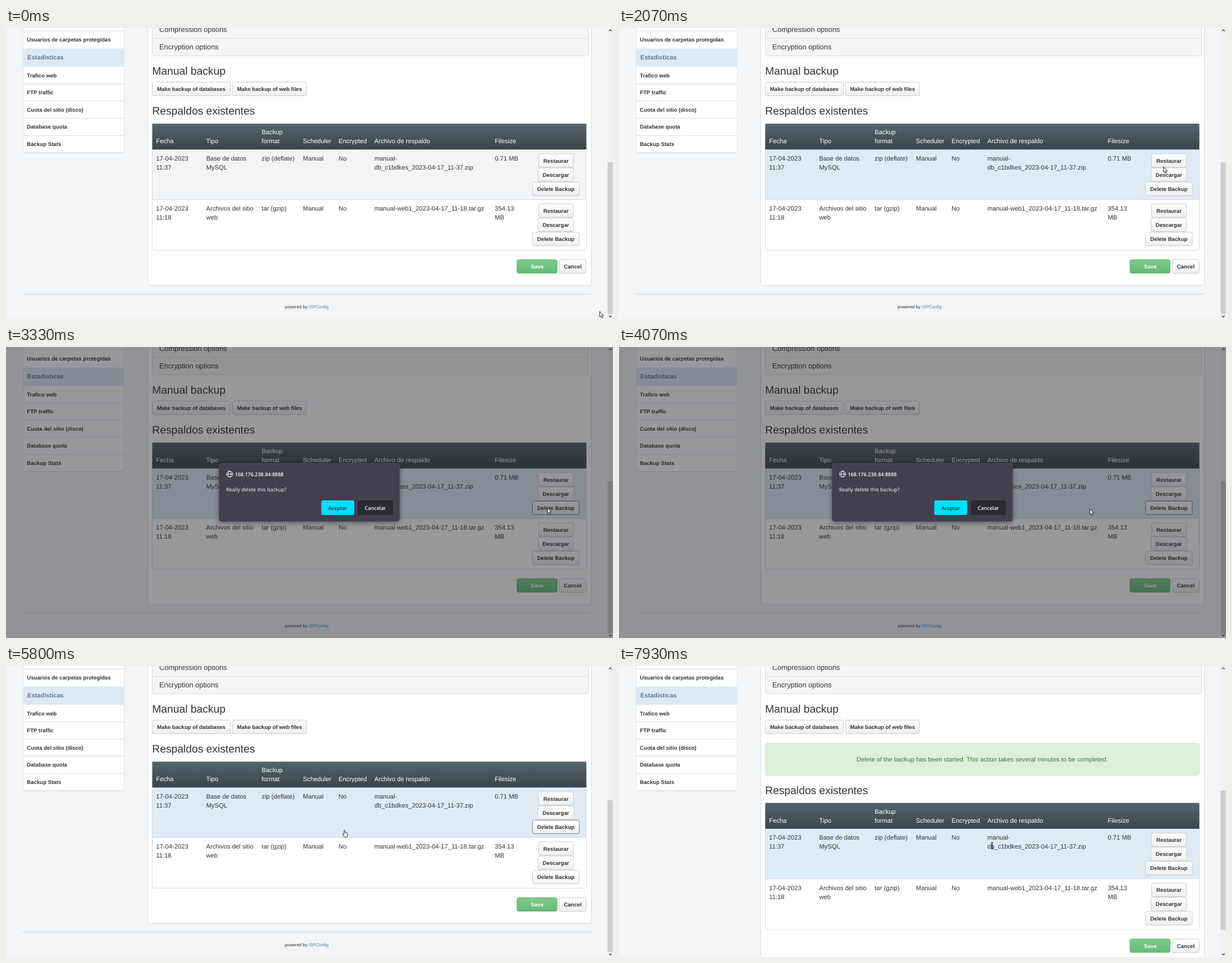
An HTML page that plays this animation: 1081 by 518 pixels, repeating every 8 s.

```html
<!DOCTYPE html>
<html lang="es">
<head>
<meta charset="utf-8">
<title>Backups</title>
<style>
  html, body { margin: 0; width: 100%; height: 100%; overflow: hidden; background: #f3f5f7; }
  svg { display: block; width: 1081px; height: 518px; text-rendering: geometricPrecision; }
  text { font-family: "Liberation Sans", Arial, sans-serif; font-size: 11.23px; fill: #333; white-space: pre; }
  .b { font-weight: 700; font-size: 9.63px; }
  .h { font-size: 19.26px; }
  .o { font-size: 12.84px; }
  .th { fill: #fff; }
  .f { font-size: 7.85px; }
  .d { font-family: "Open Sans", "Noto Sans", sans-serif; font-size: 9px; fill: #fbfbfe; }
  .s { font-weight: 600; }
  .hide { display: none; }
</style>
</head>
<body>
<svg id="stage" viewBox="0 0 1081 518">
  <defs>
    <linearGradient id="head" x2="0" y2="1"><stop stop-color="#56646c"/><stop offset="1" stop-color="#3b444b"/></linearGradient>
    <linearGradient id="btn" x2="0" y2="1"><stop stop-color="#fff"/><stop offset="1" stop-color="#efefef"/></linearGradient>
    <linearGradient id="save" x2="0" y2="1"><stop stop-color="#7ccb8b"/><stop offset="1" stop-color="#67ba78"/></linearGradient>
    <filter id="shadow" x="-10%" y="-20%" width="120%" height="150%">
      <feDropShadow dx="0" dy="2" stdDeviation="4" flood-opacity=".4"/>
    </filter>
  </defs>
</svg>
<script>
const LOOP = 8000, STEP = 1000 / 15, SHIFT = 73.5;
const stage = document.getElementById('stage');

const rect = (x, y, w, h, fill, extra = '') =>
  `<rect x="${x}" y="${y}" width="${w}" height="${h}" fill="${fill}" ${extra}/>`;
const line = (x1, x2, y, color) =>
  `<path d="M${x1} ${y}H${x2}" stroke="${color}"/>`;
const text = (x, y, s, cls = '', extra = '') =>
  `<text x="${x}" y="${y}" class="${cls}" ${extra}>${s}</text>`;
const mid = 'text-anchor="middle"';

function button(x, y, w, label, id = '') {
  return rect(x, y + 1, w, 24, '#000', 'rx="3" opacity=".07"') +
    rect(x, y, w, 24, 'url(#btn)', `rx="3" stroke="#cbcdcf" id="${id}"`) +
    text(x + w / 2, y + 15.6, label, 'b', mid);
}

function sidebar() {
  const items = [['Usuarios de carpetas protegidas', 23.8], ['Trafico web', 88], ['FTP traffic', 118.4],
    ['Cuota del sitio (disco)', 148.9], ['Database quota', 179.4], ['Backup Stats', 209.8]];
  return rect(30.5, -5, 180, 227, '#fff', 'rx="3" stroke="#dfe4e9"') +
    rect(30, 36.5, 181, 32.5, '#dce9f5') +
    [5, 99.5, 130, 160.5, 191.5].map(y => line(30, 211, y, '#d6e2ec')).join('') +
    line(32, 209, 222, '#d3d9df') +
    items.map(([s, y]) => text(37.3, y, s, 'b')).join('') +
    text(38, 55.7, 'Estadisticas', 'b', 'style="font-size:11.1px;fill:#5f7c98"');
}

function row(y, id, fill, cells) {
  return rect(261, y, 772, 89.3, fill, `id="${id}"`) +
    cells.map(([x, ...lines]) => lines.map((s, i) => text(x, y + 19.6 + i * 16, s)).join('')).join('') +
    button(948.5, y + 7.6, 62, 'Restaurar') +
    button(947.5, y + 32.8, 63.5, 'Descargar') +
    button(937.5, y + 58, 83.5, 'Delete Backup', id + 'del');
}

function table() {
  const heads = [[267.3, 'Fecha'], [356.5, 'Tipo'], [455.3, 'format'], [528.8, 'Scheduler'],
    [592.3, 'Encrypted'], [656, 'Archivo de respaldo'], [870.5, 'Filesize']];
  return text(260.3, 154.3, 'Respaldos existentes', 'h') +
    row(216.3, 'row1', '#f3f4f6', [[267.3, '17-04-2023', '11:37'], [356.5, 'Base de datos', 'MySQL'],
      [455.3, 'zip (deflate)'], [528.8, 'Manual'], [592.3, 'No'],
      [656, 'manual-', 'db_c1bdkes_2023-04-17_11-37.zip'], [870.5, '0.71 MB']]) +
    row(305.4, 'row2', '#fff', [[267.3, '17-04-2023', '11:18'], [356.5, 'Archivos del sitio', 'web'],
      [455.3, 'tar (gzip)'], [528.8, 'Manual'], [592.3, 'No'],
      [656, 'manual-web1_2023-04-17_11-18.tar.gz'], [870.5, '354.13', 'MB']]) +
    line(261, 1033, 305.5, '#d5dfe8') +
    rect(260.5, 170.5, 773, 225, 'none', 'rx="3" stroke="#d6d9dc"') +
    rect(260.5, 170.3, 773, 46, 'url(#head)') +
    text(455.3, 189.2, 'Backup', 'th') +
    heads.map(([x, s]) => text(x, 205.3, s, 'th')).join('');
}

function page() {
  return rect(0, 0, 1081, 518, '#f3f5f7') + sidebar() +
    rect(252.5, -5, 790, 463, '#fff', 'rx="3" stroke="#d8dcdf" id="panel"') +
    rect(260.5, -5, 777, 54.5, '#f5f5f5', 'rx="3" stroke="#dcdcdc"') + line(261, 1037, 18.5, '#dedede') +
    text(273, 7.4, 'Compression options', 'o') + text(273, 38.3, 'Encryption options', 'o') +
    text(260.3, 83.4, 'Manual backup', 'h') +
    button(260.5, 96.3, 139, 'Make backup of databases') +
    button(403.3, 96.3, 132, 'Make backup of web files') +
    `<g id="notice">${rect(260.5, 137.5, 773, 57, '#dff0d8', 'rx="3" stroke="#cfe6c4"')}` +
    text(646.8, 169.8, 'Delete of the backup has been started. This action takes several minutes to be completed.', '', mid + ' style="fill:#3c763d"') + '</g>' +
    `<g id="lower">${table()}` +
    rect(910, 412.4, 71.5, 24, 'url(#save)', 'rx="3" stroke="#62b073"') +
    text(946, 428, 'Save', 'b', mid + ' style="fill:#fff"') +
    button(985.3, 412.4, 48, 'Cancel') +
    line(29, 1043, 473.5, '#d3d9dd') +
    text(496.3, 498.8, 'powered by <tspan fill="#2f8fc5">ISPConfig</tspan>', 'f') + '</g>' +
    rect(1071, 0, 10, 518, '#f2f2f2') + rect(1071.5, 0, 9, 1, '#cdcdcd', 'id="thumb"') +
    '<path d="M1073.8 5.5l2.5-2.5 2.5 2.5M1073.8 512l2.5 2.5 2.5-2.5" fill="none" stroke="#505050" stroke-width="1.3"/>';
}

function dialog() {
  return `<g id="dialog">${rect(0, 0, 1081, 518, '#1c1b22', 'opacity=".45"')}` +
    rect(379.5, 207.5, 321.5, 103, '#42414d', 'rx="4" stroke="#4f4e5b" filter="url(#shadow)"') +
    '<g fill="none" stroke="#fbfbfe"><circle cx="398.3" cy="226.3" r="5.4"/><ellipse cx="398.3" cy="226.3" rx="2.4" ry="5.4"/><path d="M393 226.3h10.6"/></g>' +
    text(407.5, 229.6, '168.176.238.84:8888', 'd s') +
    text(392, 257.4, 'Really delete this backup?', 'd') +
    rect(561.5, 273, 58.7, 26, '#00ddff', 'rx="2.5" id="accept"') +
    text(590.8, 289.7, 'Aceptar', 'd s', mid + ' style="fill:#2b2a33"') +
    rect(626.7, 273, 62.6, 26, '#2b2a33', 'rx="2.5"') +
    text(657.8, 289.7, 'Cancelar', 'd s', mid) + '</g>';
}

const cursors = '<g id="cursor" stroke-linejoin="round" stroke="#111" fill="#fff" stroke-width=".9">' +
  '<path id="arrow" d="M.4.4V10.3L2.6 8.3 4.2 12 5.9 11.3 4.3 7.7H7.4Z"/>' +
  '<path id="hand" d="M-1 7V1.4a1 1 0 0 1 2 0V4.6L4.4 5.2Q5.4 5.5 5.4 6.6V9L4.4 12.2H-.4L-3.3 8.4Q-3.8 7.3-2.7 6.9L-1 8Z"/>' +
  '<path id="beam" fill="none" stroke-width="1.1" d="M-2.2-6Q0-6 0-4.8Q0-6 2.2-6M0-5V5M-2.2 6Q0 6 0 4.8Q0 6 2.2 6M-1.2 2.4H1.2"/></g>';

stage.insertAdjacentHTML('beforeend', page() + dialog() + cursors);

const el = id => document.getElementById(id);
const set = (id, name, value) => el(id).setAttribute(name, value);
const show = (id, on) => el(id).classList.toggle('hide', !on);

// time, x, y of the pointer
const path = [[0, 1057, 504], [133, 1040, 497], [200, 1040, 497], [1067, 999, 472], [1133, 991, 449],
  [1933, 972, 227], [2333, 964, 286], [3667, 964, 286], [4067, 838, 288], [4533, 659, 304],
  [5000, 603, 292], [6467, 603, 292], [6933, 610, 296], [7600, 610, 296], [7933, 664.5, 320], [LOOP, 664.5, 320]];

function pointer(t) {
  const i = Math.max(1, path.findIndex(p => p[0] >= t));
  const [t0, x0, y0] = path[i - 1], [t1, x1, y1] = path[i];
  const k = (t - t0) / (t1 - t0);
  return [x0 + (x1 - x0) * k, y0 + (y1 - y0) * k];
}

function draw(ms) {
  const t = Math.floor((ms + 5) / STEP) * STEP;
  const within = (a, b) => ms >= a && ms < b;
  const [x, y] = pointer(Math.min(t, LOOP));
  const done = ms >= 5930, modal = within(3330, 5800);

  const onAccept = modal && x < 620 && y < 299;
  const hand = onAccept || within(5000, 6530);
  const beam = ms > 7000 && x > 630;
  set('cursor', 'transform', `translate(${x} ${y})`);
  show('arrow', !hand && !beam);
  show('hand', hand);
  show('beam', beam);

  const row2 = ms < 2000 && y < 395 && y > 305;
  const row1 = (ms < 5930 && ms > 1130 && y <= 305) || ms >= 6600;
  set('row1', 'fill', row1 ? '#deeaf6' : '#f3f4f6');
  set('row2', 'fill', row2 ? '#deeaf6' : '#fff');
  set('row1del', 'stroke', within(2260, 5930) ? '#7c7f83' : '#cbcdcf');

  show('dialog', modal);
  set('accept', 'fill', ms >= 5670 ? '#aaf2ff' : onAccept ? '#80ebff' : '#00ddff');

  show('notice', done);
  set('lower', 'transform', `translate(0 ${done ? SHIFT : 0})`);
  set('panel', 'height', 463 + (done ? SHIFT : 0));
  set('thumb', 'y', done ? 222 : 239);
  set('thumb', 'height', done ? 248 : 270);
}

let start;
function tick(now) {
  start ??= now;
  draw((now - start) % LOOP);
  requestAnimationFrame(tick);
}
draw(0);
requestAnimationFrame(tick);
</script>
</body>
</html>
```
